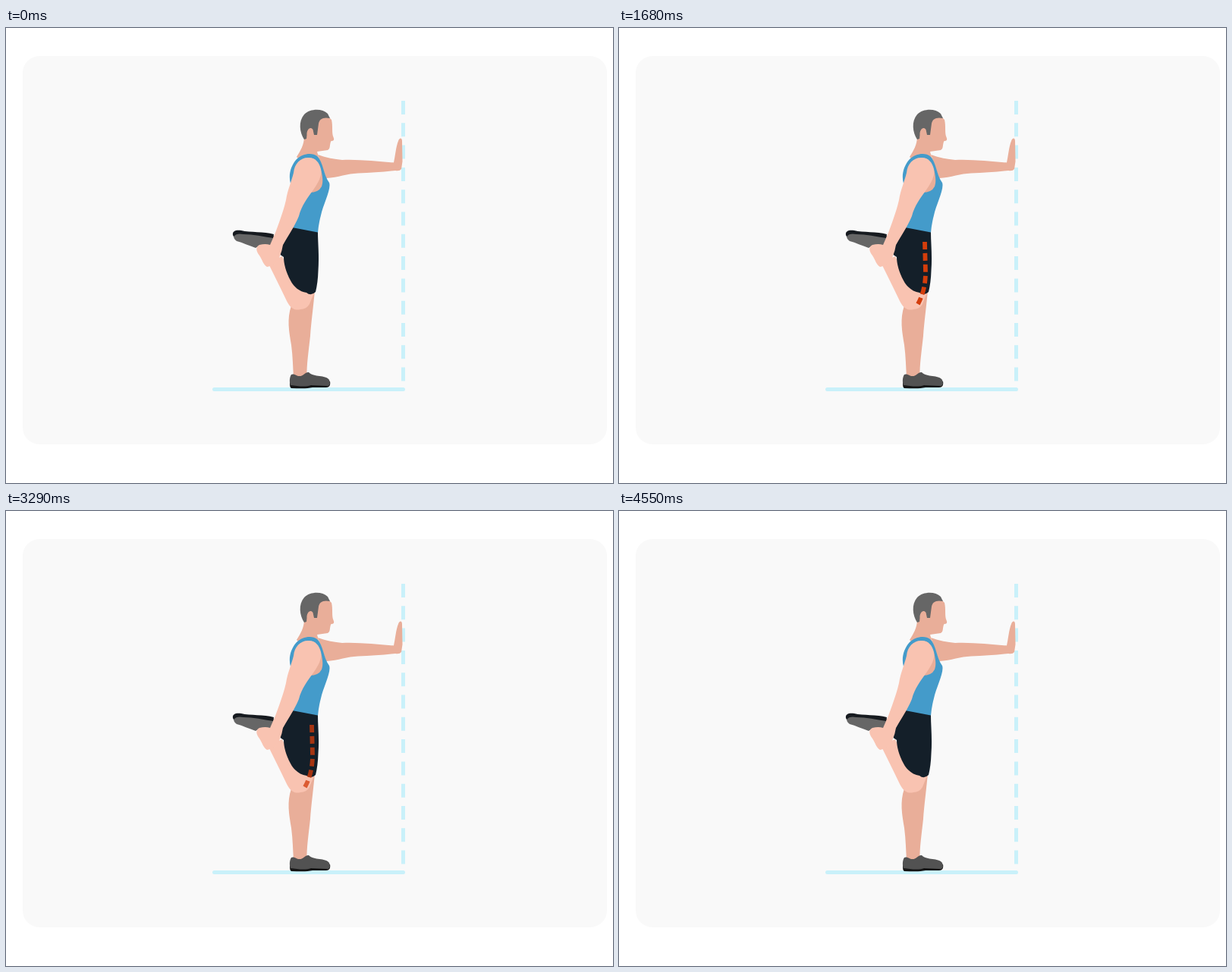
Animation, 800 px wide and 600 px high, one loop 4620 ms. Source, as an HTML page:

```html
<!DOCTYPE html>
<html lang="en">
<head>
<meta charset="utf-8">
<title>Standing quad stretch</title>
<style>
  html, body { margin: 0; width: 100%; height: 100%; overflow: hidden; background: #fff; }
  svg { display: block; width: 100%; height: 100%; }
  .far { fill: #e9ae99; }
  .near { fill: #f9c3b1; }
  .line { fill: none; stroke: #c9f1fa; stroke-width: 5; }
</style>
</head>
<body>
<svg viewBox="0 0 800 600">
  <rect x="22" y="37" width="770" height="512" rx="22" fill="#f9f9f9"/>

  <!-- wall and floor -->
  <path class="line" d="M523.5 96V467" stroke-dasharray="18 11.3"/>
  <path class="line" d="M274.5 476.5H523.5" stroke-linecap="round"/>

  <!-- standing leg -->
  <path class="far" d="M376 366C370 384 373 400 376 418C378 433 378 446 379 460H396.500C396 445 399 425 401 406C402 390 405 368 407 346L390 340Z"/>
  <path fill="#151515" d="M374 467L427 466C428 471 426 474 422 474L404 474C396 476 385 475 376 475C374 474 374 471 374 467Z"/>
  <path fill="#525252" d="M376 457C380 455 382 459 387 459C392 459 395 453 399 454C406 461 421 457 426 464Q428 469 425 472L402 471C394 474 384 472 375 471C373 466 374 460 376 457Z"/>

  <!-- far arm, neck and head -->
  <path class="far" d="M411 167C422 171 433 173 443 174C466 173 488 176 511 177.500C513 169 514 156 517 149C519 144 522 145 522 149L522.500 176L521 186Q519 189 513 188C497 190 480 191 464 191.500C450 192 438 197 422 198Z"/>
  <path class="far" d="M393 143C393 154 388 162 383 170L395 182L414 178L410 163Q417 162 424 161C428 159 426 154 428.500 149Q434 149 431.500 144C429 138 431 130 429 121L423 115H403Z"/>
  <path fill="#666" d="M393 147C387 138 385 123 393 114C401 106 417 106 424 113L427 119C418 117 413 120 412 126L410 141H406L404.500 134C401 129 396 134 396.500 141L396 146Z"/>

  <!-- top -->
  <path fill="#449bca" d="M375 205C372 194 375 182 383 173C391 165 404 164 410 169C418 176 418 193 426 204C429 212 418 233 415 247Q412 258 411 270L376 264L385 234Z"/>
  <path class="far" d="M405 172C414 178 420 198 416 209Q412 217 400 217L396 185Z"/>

  <!-- raised leg -->
  <path class="near" d="M345 309C354 327 362 343 370 360C375 370 381 373 388 371Q396 371 400 364L406 349L378 330L364 301Z"/>
  <path fill="#141f29" d="M377 263L411 269.500C411 283 413 300 411.500 320Q411 336 408 348Q402 354 396 349C387 348 379 341 375 333C369 322 366 311 366 302L361.500 299L362 291Z"/>

  <!-- raised shoe -->
  <path fill="#666" d="M300 271C308 269 339 272 353 274V286C347 291 336 284 329 290C320 287 312 283 304 281Q299 278 300 271Z"/>
  <path fill="#171b20" d="M299 273C298 267 304 266 310 267C322 270 340 268 353 272L352 277C339 275 326 272 313 272C308 271 303 271 300 275Z"/>

  <!-- near arm and hand -->
  <path class="near" d="M379 191C380 179 388 171 398 171C407 170 413 177 415 186C417 194 412 203 406 212C398 223 389 235 386 248C380 263 371 275 365 286Q364 294 360 303C357 310 350 314 344 315C339 312 338 306 334 300C329 294 329 288 334 286Q342 284 348 286L355 270C361 254 366 240 369 227C371 214 376 203 379 191Z"/>

  <!-- stretched muscle -->
  <path id="muscle" d="M403 282L404 322Q404 346 394 364" fill="none" stroke="#d43d0b" stroke-width="5.800" stroke-dasharray="10 4.900"/>
</svg>
<script>
const LOOP = 4620, STEP = 70;
const muscle = document.getElementById('muscle');
// [ms, opacity]
const keys = [[0, 0], [140, 0], [910, 1], [2240, 1], [2660, .84], [3290, .76], [3710, .27], [4060, 0], [LOOP, 0]];

function opacityAt(t) {
  const i = keys.findIndex(k => k[0] > t);
  const [t0, a] = keys[i - 1], [t1, b] = keys[i];
  return a + (b - a) * (t - t0) / (t1 - t0);
}

function draw(now) {
  const t = Math.floor(now % LOOP / STEP) * STEP;
  muscle.style.opacity = opacityAt(t);
  requestAnimationFrame(draw);
}
draw(performance.now());
</script>
</body>
</html>
```
